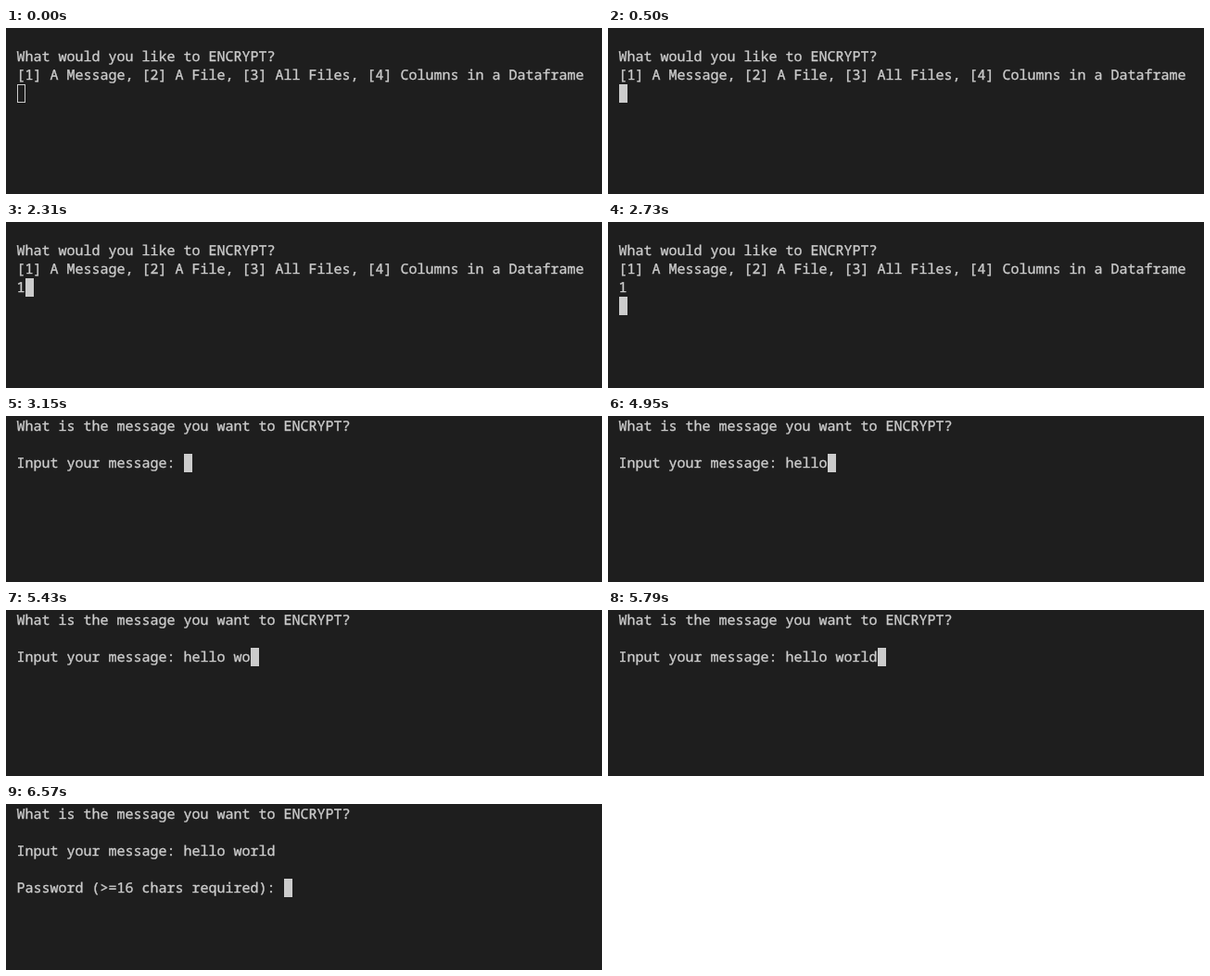
Recreate the animation shown at these times as an HTML page. Size 643 by 180 pixels, loop 8 s.

```html
<!DOCTYPE html>
<html lang="en">
<head>
<meta charset="utf-8">
<title>Encryption prompt</title>
<style>
  html, body { margin: 0; width: 100%; height: 100%; overflow: hidden; background: #1e1e1e; }
  svg { display: block; }
  text {
    font: 15px "Noto Sans Mono", "DejaVu Sans Mono", monospace;
    fill: #ccc; stroke: #ccc; stroke-width: 0.35px;
    white-space: pre; text-rendering: geometricPrecision;
  }
  rect { stroke: #ccc; }
</style>
</head>
<body>
<svg width="643" height="180" viewBox="0 0 643 180">
  <g id="lines"></g>
  <rect id="cursor" width="8" height="19"/>
</svg>
<script>
const LOOP = 8000, LEFT = 12, TOP = 1, CHAR = 9, ROW = 20;
const TEXT_LEFT = 11.5, BASELINE = 15;
const FOCUS = 500, ANSWER = 2310, ENTER = 2730, MESSAGE = 3150, PASSWORD = 6570;
const typed = "hello world";
const keyTimes = [4410, 4470, 4650, 4770, 4950, 5130, 5310, 5430, 5550, 5670, 5790];

const menu = [
  "",
  "What would you like to ENCRYPT?",
  "[1] A Message, [2] A File, [3] All Files, [4] Columns in a Dataframe"
];

const group = document.getElementById("lines");
const cursor = document.getElementById("cursor");
const rows = Array.from({ length: 5 }, (_, i) => {
  const row = document.createElementNS("http://www.w3.org/2000/svg", "text");
  row.setAttribute("x", TEXT_LEFT);
  row.setAttribute("y", TOP + i * ROW + BASELINE);
  return group.appendChild(row);
});

function screenAt(t) {
  if (t < ANSWER) return [...menu, ""];
  if (t < ENTER) return [...menu, "1"];
  if (t < MESSAGE) return [...menu, "1", ""];
  const count = keyTimes.filter(k => k <= t).length;
  const screen = [
    "What is the message you want to ENCRYPT?",
    "",
    "Input your message: " + typed.slice(0, count)
  ];
  if (t >= PASSWORD) screen.push("", "Password (>=16 chars required): ");
  return screen;
}

function draw(now) {
  const t = now % LOOP;
  const screen = screenAt(t);
  rows.forEach((row, i) => {
    const line = screen[i] || "";
    if (row.textContent !== line) row.textContent = line;
  });
  // The cursor follows the last line and is hollow until the terminal has focus.
  const last = screen.length - 1;
  cursor.setAttribute("x", LEFT + screen[last].length * CHAR + 0.5);
  cursor.setAttribute("y", TOP + last * ROW + 0.5);
  cursor.setAttribute("fill", t < FOCUS ? "none" : "#ccc");
}

const start = performance.now();
function tick() {
  draw(performance.now() - start);
  requestAnimationFrame(tick);
}
tick();
</script>
</body>
</html>
```
